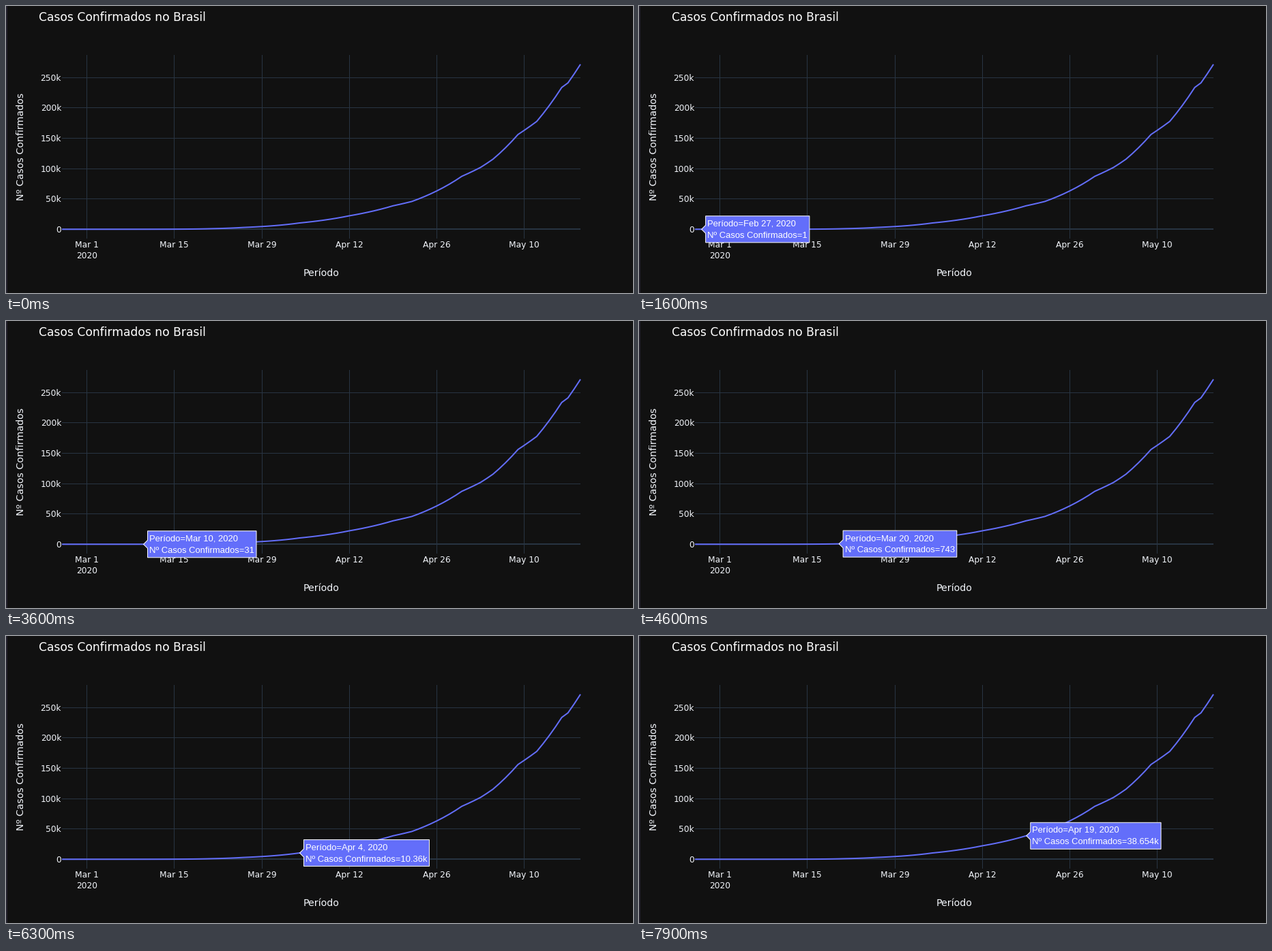
Animation of 919 by 422 pixels, one loop 8000 ms. Source, as a matplotlib script:

```python
import numpy as np
import matplotlib.pyplot as plt
from matplotlib.animation import FuncAnimation
from matplotlib.patches import Polygon, Rectangle

W, H, DPI = 919, 422, 64
PT = 72 / DPI  # points per pixel
FRAMES, INTERVAL = 80, 100

BG, GRID, BLUE, INK = "#111111", "#283442", "#636efa", "#f2f5fa"
LEFT, RIGHT, TOP, BOTTOM = 82, 842, 72, 342
ZERO_Y, PER_CASE = 328.3, 44.65 / 50000

# Key points (day since Feb 26, cases); growth is exponential in between
GROWTH = [(0, 1), (7, 4), (13, 31), (24, 1021), (29, 2985), (38, 10360),
          (46, 22192), (53, 38654), (56, 45757), (64, 87187), (67, 101826),
          (69, 115455), (73, 156061), (76, 177602), (80, 233511),
          (81, 241080), (83, 271628)]
key_days, key_cases = np.transpose(GROWTH)
DAYS = np.arange(key_days[-1] + 1)
CASES = np.rint(np.exp(np.interp(DAYS, key_days, np.log(key_cases)))).astype(int)
DAY_W = (RIGHT - LEFT) / DAYS[-1]

# Pointer sweep (step, day), steady in between
SWEEP = np.transpose([(14, 0), (17, 1.2), (20, 4), (29, 7), (36, 13), (40, 18),
                      (54, 29), (63, 38), (70, 46), (79, 53)])
FIRST_PASS, SWEEP_START = 5, 8


def day_x(day):
    return LEFT + day * DAY_W


def case_y(cases):
    return ZERO_Y - cases * PER_CASE


def date_text(day):
    for month, first, last in (("Feb", 26, 29), ("Mar", 1, 31),
                               ("Apr", 1, 30), ("May", 1, 31)):
        if first + day <= last:
            return f"{month} {first + day}"
        day -= last - first + 1


def count_text(cases):
    return f"{cases / 1000:g}k" if cases >= 10000 else str(cases)


def hovered_day(step):
    """Day under the pointer, or None while nothing is hovered."""
    if step == FIRST_PASS:
        return 2
    if step < SWEEP_START:
        return None
    return int(np.rint(np.interp(step, *SWEEP)))


fig = plt.figure(figsize=(W / DPI, H / DPI), dpi=DPI, facecolor=BG)
ax = fig.add_axes([0, 0, 1, 1])
ax.set(xlim=(0, W), ylim=(H, 0))
ax.axis("off")


def label(x, y, text, size, ha="left", font="DejaVu Sans", **kw):
    kw = {"color": INK, **kw}
    return ax.text(x, y, text, fontsize=size * PT, ha=ha, va="baseline",
                   family=font, **kw)


def grid_line(xs, ys, width=1):
    ax.plot(xs, ys, color=GRID, lw=width * PT, solid_capstyle="butt",
            snap=False, zorder=1)


ax.add_patch(Rectangle((0, 0), 2, H, color="#24222e", lw=0))

for day in DAYS[4::14]:
    x = day_x(day)
    grid_line([int(x) + 0.5] * 2, [TOP, BOTTOM])
    label(x, 355, date_text(day), 12.2, "center")
label(day_x(4), 371, "2020", 12.2, "center")

for k in range(0, 300, 50):
    y = case_y(k * 1000)
    if k:
        grid_line([LEFT, RIGHT], [int(y) + 0.5] * 2)
    else:
        grid_line([LEFT, RIGHT], [328, 328], width=2)
    label(81, y + 4.5, f"{k}k" if k else "0", 12.2, "right")

ax.plot(day_x(DAYS), case_y(CASES), color=BLUE, lw=2 * PT, snap=False,
        solid_capstyle="butt", solid_joinstyle="round", zorder=2)

label(48, 22, "Casos Confirmados no Brasil", 17.15, color="white")
label(462, 397, "Período", 14.1, "center")
label(26, 206.5, "Nº Casos Confirmados", 14.3, "center", rotation=90,
      rotation_mode="anchor")

bubble = Polygon([(0, 0), (1, 1), (1, 0)], facecolor=BLUE, edgecolor="white",
                 lw=PT, joinstyle="miter", snap=False, zorder=5)
ax.add_patch(bubble)
tip_lines = [label(0, 0, "", 13, font="Liberation Sans", color="white",
                   zorder=6) for _ in range(2)]


def draw(step):
    day = hovered_day(step)
    shown = day is not None
    for artist in (bubble, *tip_lines):
        artist.set_visible(shown)
    if shown:
        x, y = day_x(day) + 0.5, case_y(CASES[day])
        count = count_text(CASES[day])
        advance = sum({".": 3.6, "k": 6.5}.get(c, 7.23) for c in count)
        left, right = x + 6, x + 151 + advance
        top, bottom = y - 19.5, y + 19.5
        bubble.set_xy([(x, y), (left, y - 6), (left, top), (right, top),
                       (right, bottom), (left, bottom), (left, y + 6)])
        texts = (f"Período={date_text(day)}, 2020",
                 f"Nº Casos Confirmados={count}")
        for line, text, dy in zip(tip_lines, texts, (-4.5, 12.5)):
            line.set_text(text)
            line.set_position((left + 2.5, y + dy))
    return (bubble, *tip_lines)


anim = FuncAnimation(fig, draw, frames=FRAMES, interval=INTERVAL,
                     repeat=True, repeat_delay=0, blit=False)
plt.show()
```
